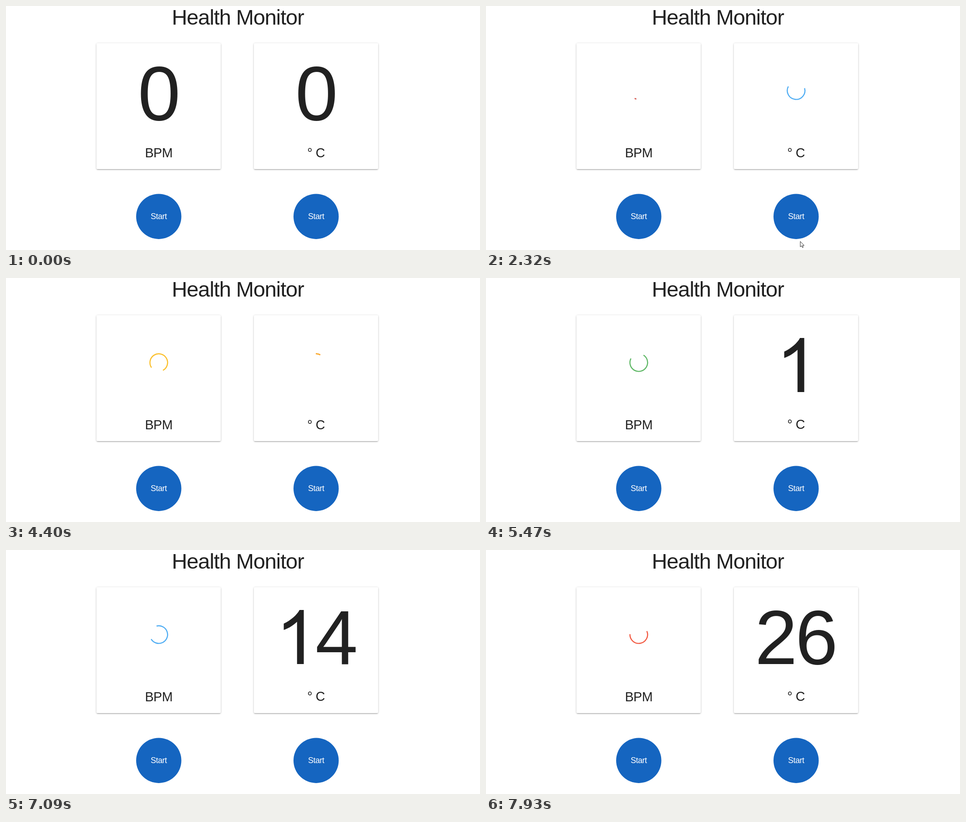
An HTML page that plays this animation: 1042x537 px, repeating every 8 s.

```html
<!DOCTYPE html>
<html lang="en">
<head>
<meta charset="utf-8">
<title>Health Monitor</title>
<style>
  html, body { margin: 0; width: 100%; height: 100%; overflow: hidden; background: #fff; }
  .card {
    position: absolute; top: 82px; width: 273px; height: 277px; border-radius: 2px; background: #fff;
    box-shadow: 0 1.6px 1.6px rgba(0,0,0,.14), 0 2.5px .8px -1.6px rgba(0,0,0,.12), 0 .8px 4px rgba(0,0,0,.2);
  }
  svg { position: absolute; left: 0; top: 0; display: block; }
  text { font-family: "Liberation Sans", Arial, sans-serif; fill: #212121; text-anchor: middle; }
  .title { font-size: 47px; letter-spacing: -1.1px; }
  .digit { font-size: 168px; }
  .unit { font-size: 28.6px; letter-spacing: -.4px; }
  .start { font-size: 18px; letter-spacing: -.5px; fill: #fff; }
  .spinner path { fill: none; stroke-width: 2.4; }
  .cursor { fill: #fff; stroke: #111; stroke-width: .9; stroke-linejoin: round; }
</style>
</head>
<body>
<div class="card" style="left:199px"></div>
<div class="card" style="left:545px"></div>
<svg id="stage" width="1042" height="537" viewBox="0 0 1042 537">
  <text class="title" x="509.6" y="41">Health Monitor</text>
</svg>
<script>
const LOOP = 8000;
const TICK = 76.97;       // playback time of one picture
const REAL = 78.1;
const FIRST = 1080;       // first spinner picture
const COUNT_TICK = 57;    // the temperature starts counting here
const COLORS = ['#4fadf3', '#f25a43', '#fbc02d', '#5fb866'];

// opacity keyframes [percent, value] of the four colour layers
const FADES = [
  [[0, 1], [25, 1], [26, 0], [89, 0], [90, 1], [100, 1]],
  [[0, 0], [15, 0], [25, 1], [50, 1], [51, 0], [100, 0]],
  [[0, 0], [40, 0], [50, 1], [75, 1], [76, 0], [100, 0]],
  [[0, 0], [65, 0], [75, 1], [90, 1], [100, 0]]
];

// pointer positions [time, x, y]
const POINTER = [
  [380, 353, 508], [680, 353, 483], [830, 353, 483], [905, 342, 472], [1080, 342, 472],
  [1470, 615, 468], [1700, 676, 482], [2000, 676, 482], [2500, 700, 540]
];

const stage = document.getElementById('stage');

function add(parent, tag, attrs, content) {
  const el = document.createElementNS('http://www.w3.org/2000/svg', tag);
  for (const key in attrs) el.setAttribute(key, attrs[key]);
  if (content) el.textContent = content;
  parent.appendChild(el);
  return el;
}

function show(el, on) {
  el.setAttribute('visibility', on ? 'visible' : 'hidden');
}

// cubic-bezier(.4, 0, .2, 1)
function ease(x) {
  let lo = 0, hi = 1;
  for (let i = 0; i < 24; i++) {
    const s = (lo + hi) / 2, r = 1 - s;
    if (1.2 * s * r * r + .6 * s * s * r + s * s * s < x) lo = s; else hi = s;
  }
  return lo * lo * (3 - 2 * lo);
}

function along(keys, x, curve) {
  let i = 1;
  while (i < keys.length - 1 && keys[i][0] < x) i++;
  const a = keys[i - 1], b = keys[i];
  const p = curve(Math.min(1, Math.max(0, (x - a[0]) / (b[0] - a[0]))));
  return a.slice(1).map((v, n) => v + (b[n + 1] - v) * p);
}

// One digit; the 1 is a plain stem with a curved flag.
function makeDigit() {
  const text = add(stage, 'text', { class: 'digit', y: 251 });
  const one = add(stage, 'path', {
    fill: '#212121',
    d: 'M17 0H2.2V-93C-4 -87 -15 -79 -27 -75V-89C-12 -96 2 -108 7.6 -119H17Z'
  });
  return (char, x) => {
    text.textContent = char === '1' ? '' : char;
    text.setAttribute('x', x);
    one.setAttribute('transform', `translate(${x} 251)`);
    show(one, char === '1');
  };
}

function makeNumber(x) {
  const first = makeDigit(), second = makeDigit();
  return value => {
    if (value.length > 1) {
      first(value[0], x - 45);
      second(value[1], x + 44);
    } else {
      first(value, x);
      second('', x);
    }
  };
}

function makeSpinner(x) {
  const group = add(stage, 'g', { class: 'spinner' });
  const layers = COLORS.map(stroke => add(group, 'path', { stroke }));
  const r = 19.4;
  const point = deg => {
    const a = deg * Math.PI / 180;
    return (x + r * Math.cos(a)).toFixed(2) + ' ' + (186.2 + r * Math.sin(a)).toFixed(2);
  };
  return (time, on) => {
    show(group, on);
    if (!on) return;
    const cycle = time % 5332;
    const steps = cycle / 666.5;
    const n = Math.floor(steps);
    const p = ease(steps - n);
    const half = 5 + 135 * (n % 2 ? 1 - p : p);
    const mid = 270 + time / 1568 * 360 + 135 * (n + p);
    const d = `M${point(mid - half)}A${r} ${r} 0 ${half > 90 ? 1 : 0} 1 ${point(mid + half)}`;
    layers.forEach((layer, i) => {
      layer.setAttribute('d', d);
      layer.setAttribute('opacity', along(FADES[i], cycle / 53.32, ease)[0].toFixed(3));
    });
  };
}

function makePanel(x, unit) {
  const label = add(stage, 'text', { class: 'unit', x, y: 333 }, unit);
  add(stage, 'circle', { cx: x, cy: 463.2, r: 49.7, fill: '#1565c0' });
  add(stage, 'text', { class: 'start', x, y: 468.8 }, 'Start');
  return { x, label, number: makeNumber(x + .9), spinner: makeSpinner(x) };
}

const bpm = makePanel(335.8, 'BPM');
const temp = makePanel(681.7, '° C');

const arrow = add(stage, 'path', { class: 'cursor', d: 'M0 0V12L2.8 9.6L4.6 13.6L6.5 12.8L4.8 8.9H8.4Z' });
const hand = add(stage, 'path', {
  class: 'cursor',
  d: 'M-1 1Q0 -.6 1 1V5L6 6Q7 6.3 7 7.6V10.5L5.6 14.5H-.6L-3.8 9.6Q-4 7.6 -2.6 8L-1 9.4Z'
});

function drawPointer(t) {
  const q = t < FIRST
    ? 380 + 75 * Math.floor((t - 380) / 75)
    : FIRST + TICK * Math.floor((t - FIRST) / TICK + .05);
  const [x, y] = along(POINTER, q, p => p);
  const inside = [bpm, temp].some(panel => Math.hypot(x - panel.x, y - 463) < 50);
  const on = t >= 380 && q < 2500;
  for (const el of [arrow, hand]) {
    el.setAttribute('transform', `translate(${x} ${y})`);
    show(el, on && (el === hand) === inside);
  }
}

function draw(t) {
  const tick = Math.floor((t - FIRST) / TICK + .05);
  const counting = tick >= COUNT_TICK;
  const waiting = tick >= 12 && !counting;

  bpm.number(tick < 0 ? '0' : '');
  bpm.spinner(24 + tick * REAL, tick >= 0);

  let value = waiting ? '' : '0';
  if (counting) {
    const p = Math.min(1, (50 + (tick - COUNT_TICK) * REAL) / 4000);
    value = String(Math.ceil(36 * (.5 - Math.cos(Math.PI * p) / 2)));
  }
  temp.number(value);
  temp.spinner(31 + (tick - 12) * REAL, waiting);
  temp.label.setAttribute('y', counting ? 332.2 : 333);

  drawPointer(t);
}

const begin = performance.now();
function loop() {
  draw((performance.now() - begin) % LOOP);
  requestAnimationFrame(loop);
}
loop();
</script>
</body>
</html>
```
